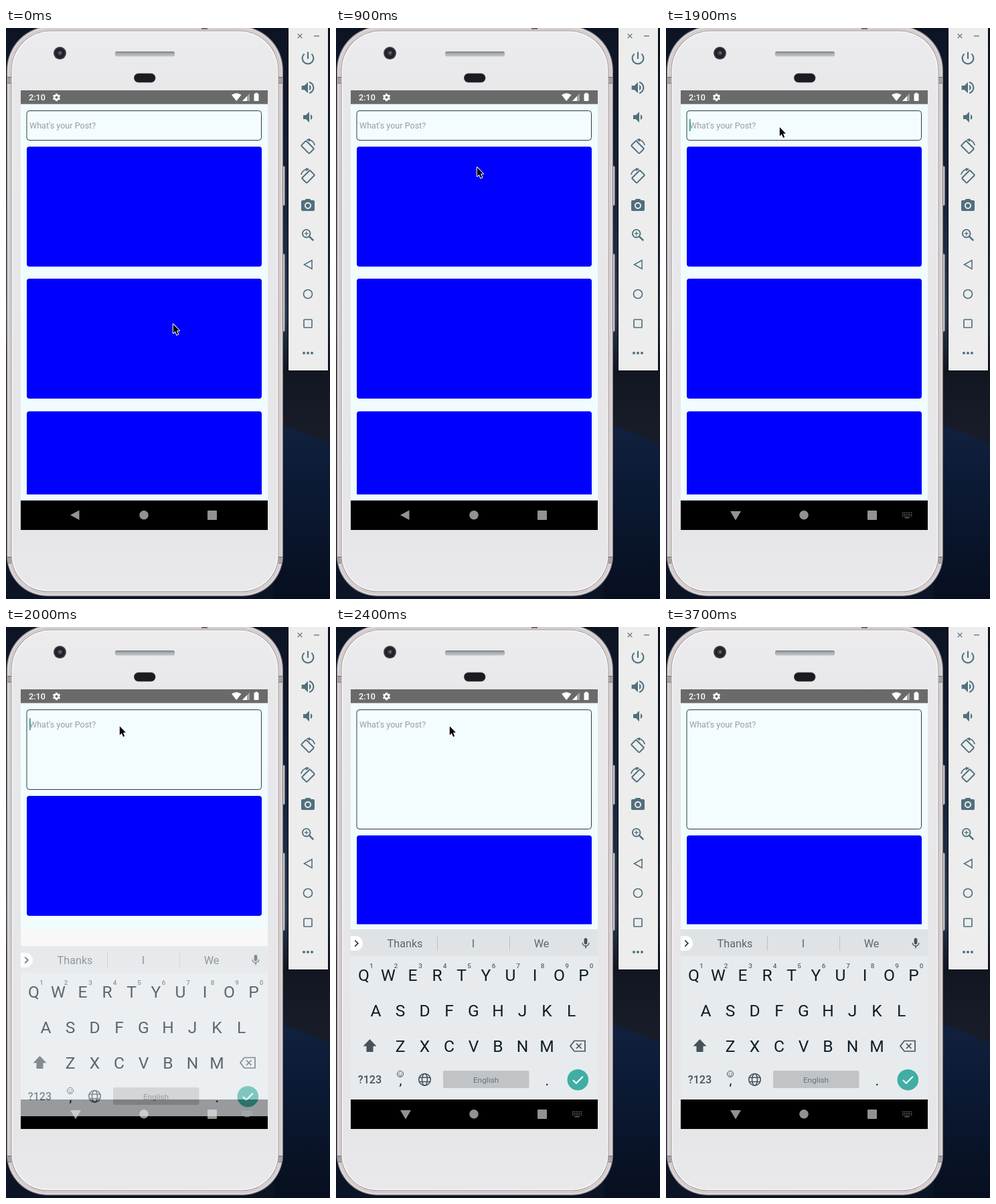
Animation, 484 px wide and 852 px high, one loop 3.9 s. Source, as an HTML page with a canvas:

```html
<!DOCTYPE html>
<html lang="en">
<head>
<meta charset="utf-8">
<title>Post input on a phone</title>
<style>
html, body { margin: 0; width: 100%; height: 100%; overflow: hidden; background: #0d1526; }
canvas { display: block; width: 484px; height: 852px; }
</style>
</head>
<body>
<canvas id="stage" width="484" height="852"></canvas>
<script>
const stage = document.getElementById('stage').getContext('2d');
let ctx = stage;
const LOOP = 3900, STEP = 100, TAU = Math.PI * 2;
const TOOL = '#50707d', NAV = '#929292', KEY = '#0f1d26', SOFT = '#46535b';

const POWER = new Path2D('M13 3h-2v10h2V3zm4.83 2.17l-1.42 1.42C17.99 7.86 19 9.81 19 12c0 3.87-3.13 7-7 7s-7-3.13-7-7c0-2.19 1.01-4.14 2.58-5.42L6.17 5.17C4.23 6.82 3 9.26 3 12c0 4.97 4.03 9 9 9s9-4.03 9-9c0-2.74-1.23-5.18-3.17-6.83z');
const LOUD = new Path2D('M3 9v6h4l5 5V4L7 9H3zm13.5 3c0-1.77-1.02-3.29-2.5-4.03v8.05c1.48-.73 2.5-2.25 2.5-4.02zM14 3.23v2.06c2.89.86 5 3.54 5 6.71s-2.11 5.85-5 6.71v2.06c4.01-.91 7-4.49 7-8.77s-2.99-7.86-7-8.77z');
const QUIET = new Path2D('M18.5 12c0-1.77-1.02-3.29-2.5-4.03v8.05c1.48-.73 2.5-2.25 2.5-4.02zM5 9v6h4l5 5V4L9 9H5z');
const CAMERA = new Path2D('M9 2L7.17 4H4c-1.1 0-2 .9-2 2v12c0 1.1.9 2 2 2h16c1.1 0 2-.9 2-2V6c0-1.1-.9-2-2-2h-3.17L15 2H9zm3 15c-2.76 0-5-2.24-5-5s2.24-5 5-5 5 2.24 5 5-2.24 5-5 5z');
const MIC = new Path2D('M12 14c1.66 0 3-1.34 3-3V5c0-1.66-1.34-3-3-3S9 3.34 9 5v6c0 1.66 1.34 3 3 3zm5.3-3c0 3-2.54 5.1-5.3 5.1S6.7 14 6.7 11H5c0 3.41 2.72 6.23 6 6.72V21h2v-3.28c3.28-.48 6-3.3 6-6.72h-1.7z');
const ARROW = new Path2D('M.8 1V14.2L3.8 11.4 6.1 16.8 8.2 15.9 6 10.6H10Z');

function rect(x, y, w, h, fill) {
  ctx.fillStyle = fill;
  ctx.fillRect(x, y, w, h);
}
function round(x, y, w, h, r, fill, stroke, width = 1) {
  ctx.beginPath();
  ctx.roundRect(x, y, w, h, r);
  if (fill) { ctx.fillStyle = fill; ctx.fill(); }
  if (stroke) { ctx.strokeStyle = stroke; ctx.lineWidth = width; ctx.stroke(); }
}
function disc(x, y, r, fill) {
  ctx.fillStyle = fill;
  ctx.beginPath();
  ctx.arc(x, y, r, 0, TAU);
  ctx.fill();
}
function ring(x, y, r, color, width, from = 0, to = TAU) {
  ctx.strokeStyle = color;
  ctx.lineWidth = width;
  ctx.beginPath();
  ctx.arc(x, y, r, from, to);
  ctx.stroke();
}
function trace(path, color, width) {
  ctx.strokeStyle = color;
  ctx.lineWidth = width;
  ctx.stroke(new Path2D(path));
}
function shape(path, color) {
  ctx.fillStyle = color;
  ctx.fill(new Path2D(path));
}
function icon(path, x, y, size, color) {
  ctx.save();
  ctx.translate(x - size / 2, y - size / 2);
  ctx.scale(size / 24, size / 24);
  ctx.fillStyle = color;
  ctx.fill(path);
  ctx.restore();
}
function text(value, x, y, size, color, align = 'left', weight = 400) {
  ctx.font = `${weight} ${size}px Roboto, sans-serif`;
  ctx.fillStyle = color;
  ctx.textAlign = align;
  ctx.fillText(value, x, y);
}
function vertical(y0, y1, ...stops) {
  const g = ctx.createLinearGradient(0, y0, 0, y1);
  stops.forEach(([at, color]) => g.addColorStop(at, color));
  return g;
}
// Linear value between [time, value] points.
function along(points, t) {
  if (t <= points[0][0]) return points[0][1];
  for (let i = 1; i < points.length; i++) {
    const [t0, a] = points[i - 1], [t1, b] = points[i];
    if (t <= t1) return a + (b - a) * (t - t0) / (t1 - t0);
  }
  return points[points.length - 1][1];
}

function drawWallpaper() {
  rect(0, 0, 484, 852, vertical(0, 852, [0, '#0c1424'], [.3, '#15233b'], [.5, '#263750'], [.6, '#121621'], [.7, '#181c29'], [1, '#0b1426']));
  ctx.fillStyle = vertical(590, 852, [0, '#11213f'], [.4, '#0b1933'], [1, '#070f1f']);
  ctx.beginPath();
  ctx.moveTo(400, 590);
  ctx.quadraticCurveTo(446, 602, 484, 622);
  ctx.lineTo(484, 852);
  ctx.lineTo(400, 852);
  ctx.fill();
}

function drawPhone() {
  for (const [y, h] of [[206, 59], [337, 116]]) {
    round(411, y, 5.5, h, 2, '#c9c4c6', '#77757b');
  }
  const layers = [[0, '#8c8587'], [1.2, '#ded8da'], [4, '#c8c0c1'], [5.4, '#f0ebec'], [6.4, '#94898a'], [7.4, '#f3f1f3']];
  for (const [inset, color] of layers) {
    const top = 66 - inset, bottom = 61 - inset;
    round(1 + inset, -3 + inset, 413 - 2 * inset, 851 - 2 * inset, [top, top, bottom, bottom], color);
  }
  round(10.5, 6.5, 394, 832, [57, 57, 52, 52], vertical(0, 840, [0, '#ececee'], [.12, '#e8e7e9'], [.9, '#e6e5e7'], [1, '#e9e8ea']));
  for (const y of [73, 789]) {
    for (const x of [2, 407]) {
      rect(x, y, 6, 10, '#aaa3a5');
      rect(x, y, 6, 1, '#6f696b');
      rect(x, y + 9, 6, 1, '#837c7e');
    }
  }
  rect(292, 0, 9, 2, '#77686a');

  disc(80.5, 37.5, 9.4, '#3a3a3f');
  disc(80.5, 37.5, 7.4, '#202126');
  disc(80.5, 37.5, 3.8, '#383c49');
  disc(81, 37, 1.6, '#73798a');
  round(163, 35, 89, 7.5, 2.5, vertical(35, 43, [0, '#777e86'], [.4, '#a9adb2'], [1, '#c6c8cb']));
  round(191.5, 68, 31.5, 13, 6.2, '#1b1b21', '#34343b', .7);
}

function drawRotate(y, mirror) {
  ctx.save();
  ctx.translate(451, y);
  ctx.scale(mirror, 1);
  ctx.save();
  ctx.translate(-.5, .8);
  ctx.rotate(Math.PI / 4);
  round(-8.5, -5.2, 17, 10.4, 1.2, null, TOOL, 2);
  ctx.restore();
  ring(0, 0, 10.4, TOOL, 1.8, -1.6, -.2);
  shape('M-2.5 -10.4L3 -12.2V-7.2Z', TOOL);
  ctx.restore();
}

function drawToolbar() {
  rect(421, 0, 61, 512, '#05070c');
  rect(422, 0, 59, 511, '#ededee');
  trace('M435.7 8.7l6.6 6.6m0-6.6l-6.6 6.6M460 12h8', '#668390', 1.4);
  icon(POWER, 451, 45, 25, TOOL);
  icon(LOUD, 451, 89, 25, TOOL);
  icon(QUIET, 451, 133, 24, TOOL);
  drawRotate(177, 1);
  drawRotate(221, -1);
  icon(CAMERA, 451, 265, 24, TOOL);
  disc(451, 265, 3.1, TOOL);
  ring(448.7, 306.7, 5.8, TOOL, 1.9);
  trace('M452.9 310.9l6.3 6.3', TOOL, 2.6);
  trace('M445.7 306.7h6m-3-3v6', TOOL, 1.3);
  trace('M457 346.5v13l-11.5-6.5z', TOOL, 1.6);
  ring(451, 397, 6.5, TOOL, 1.7);
  round(445, 435, 12, 12, 1, null, TOOL, 1.7);
  for (const x of [445, 451, 457]) disc(x, 485, 2, TOOL);
}

function drawStatus() {
  rect(22, 93, 369, 20.5, '#6a6a6a');
  text('2:10', 34, 108, 12.6, '#fff', 'left', 500);
  ring(75.5, 103.5, 3.2, '#fff', 2.5);
  for (let i = 0; i < 6; i++) {
    ctx.save();
    ctx.translate(75.5, 103.5);
    ctx.rotate(i * TAU / 6 + TAU / 12);
    rect(3, -1.4, 2.7, 2.8, '#fff');
    ctx.restore();
  }
  shape('M337 99.8Q344.2 94.5 351.5 99.8L344.2 109Z', '#fff');
  shape('M364 97.5V109H353Z', '#a5a5a5');
  shape('M360 101.7V109H353Z', '#fff');
  round(370.5, 98, 7, 11, 1, '#fff');
  rect(372.3, 96.7, 3.4, 2, '#fff');
}

function drawNav(open) {
  rect(22, 705, 369, 44, '#000');
  shape(open ? 'M96 721H112L104 734.5Z' : 'M109.5 719.5V734L96 726.7Z', NAV);
  disc(206, 726.8, 6.8, NAV);
  round(301, 720, 14, 14, 1, NAV);
  if (!open) return;
  for (let row = 0; row < 3; row++) {
    for (let i = 0; i < 6; i++) rect(353 + i * 2.6, 722.5 + row * 2.5, 1.4, 1.3, '#777');
  }
  rect(356.5, 730, 7, 1.3, '#777');
}

function drawPosts(bottom, open, caret) {
  rect(22, 113.5, 369, 592, '#f1fcff');
  round(31, 123.5, 350.5, bottom - 123.5, 4, '#f3fcff', '#34383b');
  text("What's your Post?", 35, 150, 12.57, '#999c9e');
  if (caret) rect(35, 136, 1.6, 18, '#25998a');
  const clip = open ? 443.5 : 696;
  ctx.save();
  ctx.beginPath();
  ctx.rect(22, 114, 369, clip - 114);
  ctx.clip();
  for (let y = bottom + 9.5; y < clip; y += 197.3) round(31, Math.round(y), 351, 179, 4, '#0000fe');
  ctx.restore();
}

function drawRow(letters, x, y) {
  [...letters].forEach((c, i) => text(c, x + i * 36.5, y + 9, 24.6, KEY, 'center'));
}

function drawKeyboard() {
  rect(22, 451, 369, 254, '#e7ebee');
  rect(22, 451, 369, 40, '#dfe3e6');
  round(22, 461, 18, 22, [0, 11, 11, 0], '#fff');
  trace('M28.3 467.7l4.5 4.4-4.5 4.4', '#333d43', 1.8);
  ['Thanks', 'I', 'We'].forEach((word, i) => text(word, 103 + i * 102, 478, 16.2, '#5b676e', 'center'));
  for (const x of [151, 259]) rect(x, 461, 1, 22, '#bcc2c6');
  icon(MIC, 373, 472, 19, SOFT);

  drawRow('QWERTYUIOP', 41.5, 519);
  [...'1234567890'].forEach((c, i) => text(c, 53 + i * 36.5, 508.5, 9.9, '#57646b', 'center', 500));
  drawRow('ASDFGHJKL', 59.5, 572);
  drawRow('ZXCVBNM', 96, 625);
  shape('M50.5 615L60.5 625.5H55.5V634H45.5V625.5H40.5Z', SOFT);
  trace('M356 617.5H372V633H356L350 625.2Z', SOFT, 1.7);
  trace('M359 621.5l7.5 7.5m0-7.5l-7.5 7.5', SOFT, 1.7);

  text('?123', 50.5, 681, 16.2, SOFT, 'center', 500);
  ring(96, 667, 4.6, SOFT, 1);
  ring(96, 667.3, 2.4, SOFT, 1, .2, Math.PI - .2);
  disc(94.3, 665.7, .8, SOFT);
  disc(97.7, 665.7, .8, SOFT);
  text(',', 96.5, 683, 20, KEY, 'center');
  ring(132.5, 675.3, 8.8, SOFT, 1.6);
  ctx.beginPath();
  ctx.ellipse(132.5, 675.3, 4, 8.8, 0, 0, TAU);
  ctx.stroke();
  trace('M124.7 672.2h15.6m-15.6 6.2h15.6', SOFT, 1.5);
  round(160, 662, 128.5, 26, 2.5, '#c0c4c7');
  text('English', 224, 679.5, 11.8, '#697278', 'center');
  text('.', 315.5, 684, 22, KEY, 'center');
  disc(361.3, 675.7, 15.8, '#40aea4');
  trace('M354 676l4.8 4.8 10-10', '#fff', 2);
}

// The keyboard is drawn once, so that it can fade as a single layer.
function makeKeyboard() {
  const layer = document.createElement('canvas');
  layer.width = 484;
  layer.height = 852;
  ctx = layer.getContext('2d');
  drawKeyboard();
  ctx = stage;
  return layer;
}

function drawPointer(t) {
  const x = along([[500, 249], [600, 222], [700, 210], [900, 210], [1300, 169], [2700, 169], [2900, 167], [3200, 167], [3500, 215]], t);
  const y = along([[500, 441], [600, 292], [700, 207], [900, 207], [1300, 147], [2700, 147], [2900, 148], [3200, 148], [3500, -24]], t);
  ctx.save();
  ctx.translate(x, y);
  ctx.lineJoin = 'round';
  ctx.strokeStyle = '#fff';
  ctx.lineWidth = 2;
  ctx.stroke(ARROW);
  ctx.fillStyle = '#000';
  ctx.fill(ARROW);
  ctx.restore();
}

const keyboard = makeKeyboard();

function draw(t) {
  const bottom = along([[1900, 167.5], [2000, 242.5], [2100, 298.2], [2200, 301.5]], t);
  const caret = t >= 1800 && (t - 1800) % 1000 < 500;
  const open = t >= 2000, entering = open && t < 2100;
  drawWallpaper();
  drawPhone();
  drawToolbar();
  drawPosts(bottom, open, caret);
  drawStatus();
  drawNav(t >= 1900);
  if (entering) {
    rect(22, 451, 369, 254, '#f8f8f9');
    ctx.globalAlpha = .66;
    ctx.drawImage(keyboard, 0, 25);
    ctx.globalAlpha = 1;
  } else if (open) {
    ctx.drawImage(keyboard, 0, 0);
  }
  drawPointer(t);
}

const start = performance.now();
function frame() {
  const t = (performance.now() - start) % LOOP;
  draw(Math.floor(t / STEP) * STEP);
  requestAnimationFrame(frame);
}
frame();
</script>
</body>
</html>
```
